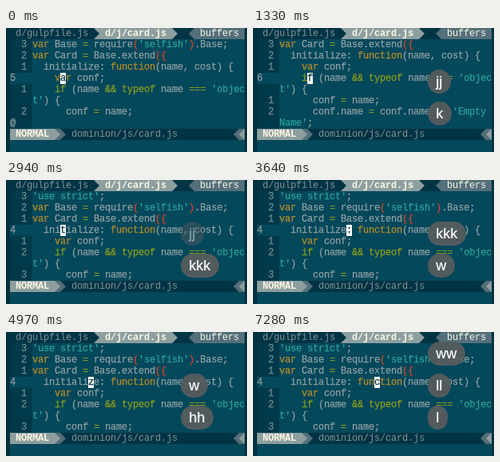
Animation, 302 px wide and 155 px high, one loop 8260 ms. Source, as an HTML page:

```html
<!DOCTYPE html>
<html lang="en">
<head>
<meta charset="utf-8">
<title>Moving in an editor</title>
<style>
html, body { margin: 0; width: 100%; height: 100%; overflow: hidden; background: #04485c; }
#stage { position: relative; width: 302px; height: 155px; overflow: hidden;
  font: 12px/14px "Liberation Mono", "DejaVu Sans Mono", monospace;
  letter-spacing: -.201px; color: #8fa0a2; white-space: pre; }
#stage div, #stage svg { position: absolute; }
#stage svg, #text, #keys { left: 0; top: 0; }
#text { -webkit-text-stroke: .25px currentColor; }
.row { height: 14px; }
.dim { color: #7f9398; }
.num { color: #6f8a92; }
.here, .cur { display: inline-block; height: 14px; vertical-align: top; }
.here { background: #04485c; color: #8fa0a2; }
.cur { background: #fff; color: #00303d; }
.var { color: #b58c2a; }
.word { color: #8c9f1c; }
.str { color: #2aa198; }
.red { color: #d5452a; }
.lit { color: #fdf6e3; }
.key { left: 219px; height: 30px; padding: 0 10.3px; border-radius: 15px;
  background: rgba(86, 92, 94, .95); color: #fff; -webkit-text-stroke: .2px #fff;
  font: 18px/30px "Liberation Sans", Arial, sans-serif; letter-spacing: 0; }
</style>
</head>
<body>
<div id="stage">
  <svg width="302" height="155" viewBox="0 0 302 155">
    <path fill="#00303d" d="M0 0H5V155H0ZM299 0H302V155H299Z"/>
    <path fill="#003a4a" d="M5 14H33V126H5Z"/>
    <path fill="#003444" d="M5 0H299V14H5ZM5 126H299V140H5Z"/>
    <path fill="#53707a" d="M61 126H68L75 133L68 140H61ZM299 126H292L285 133L292 140H299ZM299 0H236L229 7L236 14H299Z"/>
    <path fill="#8d9f a0" d=""/>
    <path fill="#8d9fa0" d="M110 0H208L215 7L208 14H110L117 7ZM5 126H61L68 133L61 140H5ZM299 126L292 133L299 140Z"/>
  </svg>
  <div class="row dim" style="left:12px;top:0">d/gulpfile.js</div>
  <div class="row lit" style="left:124px;top:0"><b>d/j/card.js</b></div>
  <div class="row lit" style="left:243px;top:0">buffers</div>
  <div class="row lit" style="left:12px;top:126px"><b>NORMAL</b></div>
  <div class="row dim" style="left:82px;top:126px">dominion/js/card.js</div>
  <div id="text"></div>
  <div id="keys"></div>
</div>
<script>
const LOOP = 8260, TICK = 70, COLS = 38, ROWS = 8;

const source = [
  "'use strict';",
  "var Base = require('selfish').Base;",
  "var Card = Base.extend({",
  "  initialize: function(name, cost) {",
  "    var conf;",
  "    if (name && typeof name === 'object') {",
  "      conf = name;",
  "      conf.name = conf.name || 'Empty Name';",
  "    } else {"
];

// time, line, column
const moves = [
  [0, 5, 5], [630, 6, 5], [840, 7, 5], [1330, 6, 5], [1540, 5, 5], [1750, 4, 5],
  [3640, 4, 12], [4480, 4, 11], [4970, 4, 10], [5740, 4, 12], [6160, 4, 14],
  [6790, 4, 15], [7000, 4, 16], [7280, 4, 17]
];

// time, visible key groups from oldest to newest
const presses = [
  [0, ""], [630, "j"], [770, "jj"], [1330, "jj k"], [1540, "jj kk"], [1750, "jj kkk"],
  [3080, "kkk"], [3640, "kkk w"], [3990, "w"], [4480, "w h"], [4900, "w hh"],
  [5740, "w hh w"], [5880, "hh w"], [6160, "hh ww"], [6720, "hh ww l"],
  [7000, "hh ww ll"], [7210, "ww ll"], [7280, "ww ll l"]
];

// start and number of ticks until the oldest group is gone
const fades = [[2870, 4], [3850, 3], [5740, 3], [7000, 4]];

const at = (steps, t) => steps.findLast(s => s[0] <= t);
const escapeChar = c => ({ "&": "&amp;", "<": "&lt;" }[c] || c);

function colourize(line) {
  const cells = [...line].map(c => [c, ""]);
  const paint = (re, cls) => {
    for (const m of line.matchAll(re))
      for (let i = 0; i < m[0].length; i++) cells[m.index + i][1] = cls;
  };
  paint(/\b(if|else|typeof)\b|===|&&|\|\||=/g, "word");
  paint(/\b(var|function)\b/g, "var");
  paint(/\(\{|\((?=')|\)(?=\.)/g, "red");
  paint(/'[^']*'/g, "str");
  return cells;
}

function toHtml(cells) {
  let html = "", last = "";
  for (const [c, cls] of cells) {
    if (cls !== last) html += (last ? "</span>" : "") + (cls ? `<span class="${cls}">` : "");
    html += escapeChar(c);
    last = cls;
  }
  return html + (last ? "</span>" : "");
}

function lineNumber(n, line) {
  return n === line
    ? `<span class="here">${String(n).padEnd(4)}</span>`
    : `<span class="num">  ${Math.abs(n - line)} </span>`;
}

function screen(line, col) {
  const rows = [];
  for (let n = line - 3; n <= source.length && rows.length < ROWS; n++) {
    const cells = colourize(source[n - 1]);
    if (n === line) cells[col][1] = "cur";
    const need = Math.ceil(cells.length / COLS);
    if (rows.length + need > ROWS) { rows.push([5, "@"]); break; }
    rows.push([5, lineNumber(n, line) + toHtml(cells.slice(0, COLS))]);
    if (need > 1) rows.push([33, toHtml(cells.slice(COLS))]);
  }
  return rows.map(([x, html], i) =>
    `<div class="row" style="left:${x}px;top:${14 + 14 * i}px">${html}</div>`).join("");
}

function bubbles(list, alpha) {
  return list.map((s, i) => {
    const y = 92 - 40 * (list.length - 1 - i);
    return `<div class="key" style="top:${y}px;opacity:${i ? 1 : alpha}">${s}</div>`;
  }).join("");
}

function oldestAlpha(t) {
  for (const [start, n] of fades)
    if (t >= start && t < start + (n - 1) * TICK)
      return 1 - (Math.floor((t - start) / TICK) + 1) / n;
  return 1;
}

const shown = {};
function put(id, html) {
  if (shown[id] === html) return;
  shown[id] = html;
  document.getElementById(id).innerHTML = html;
}

function draw(t) {
  const [, line, col] = at(moves, t);
  put("text", screen(line, col));
  put("keys", bubbles(at(presses, t)[1].split(" ").filter(Boolean), oldestAlpha(t)));
}

const begin = performance.now();
function frame() {
  draw((performance.now() - begin) % LOOP);
  requestAnimationFrame(frame);
}
frame();
</script>
</body>
</html>
```
